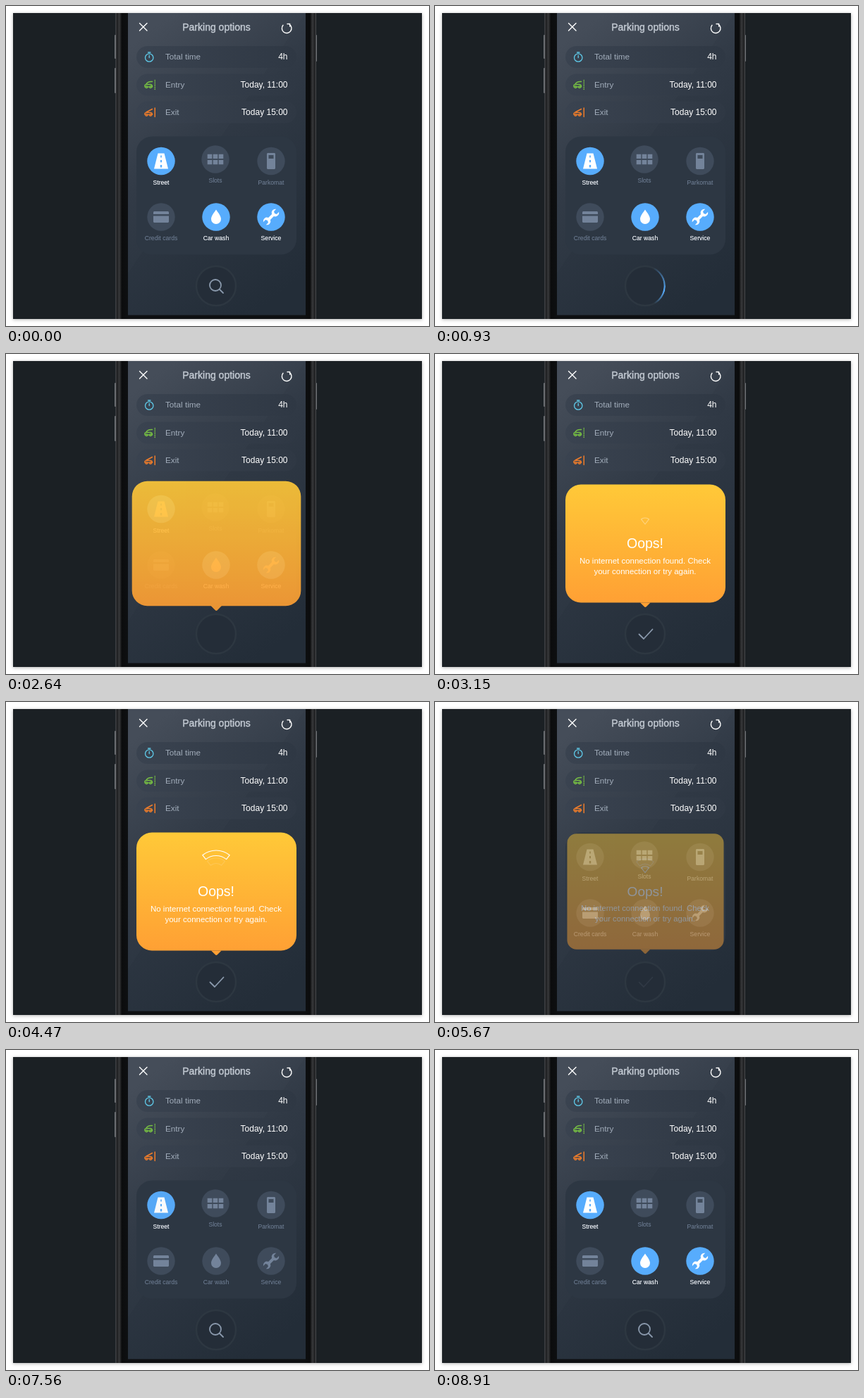
An HTML page for the animation above (8.94 s loop, 600 by 455 pixels).

```html
<!DOCTYPE html>
<html lang="en">
<head>
<meta charset="utf-8">
<title>Parking options</title>
<style>
  html, body { margin: 0; width: 100%; height: 100%; overflow: hidden; background: #fff; }
  svg { position: absolute; left: 0; top: 0; }
  text { font-family: "Liberation Sans", Arial, sans-serif; }
  .line { fill: none; stroke-linecap: round; stroke-linejoin: round; }
  .row { font-size: 11.7px; }
  .label { font-size: 8.65px; text-anchor: middle; }
  #spinner {
    position: absolute; left: 269px; top: 369px; width: 58px; height: 58px; border-radius: 50%;
    background: conic-gradient(#57acfd00, #57acfd 80deg, #57acfd00 128deg);
    -webkit-mask: radial-gradient(circle, #0000 26.2px, #000 27px);
    mask: radial-gradient(circle, #0000 26.2px, #000 27px);
  }
</style>
</head>
<body>
<svg width="600" height="455" viewBox="0 0 600 455">
  <defs>
    <filter id="shadow" x="-5%" y="-5%" width="110%" height="110%" color-interpolation-filters="sRGB">
      <feDropShadow dx="0" dy="1" stdDeviation="2.5" flood-opacity=".3"/>
    </filter>
    <linearGradient id="screen" x1=".25" y1="0" x2=".7" y2="1">
      <stop stop-color="#434b57"/><stop offset=".4" stop-color="#303945"/><stop offset="1" stop-color="#232d38"/>
    </linearGradient>
    <linearGradient id="pill">
      <stop stop-color="#3a4350"/><stop offset="1" stop-color="#2f3844"/>
    </linearGradient>
    <linearGradient id="edge">
      <stop stop-color="#56585b"/><stop offset=".1" stop-color="#1c1d1f"/><stop offset=".3" stop-color="#38393b"/>
      <stop offset=".5" stop-color="#0b0c0d"/><stop offset="1" stop-color="#0e1012"/>
    </linearGradient>
    <linearGradient id="warm" x2="0" y2="1">
      <stop stop-color="#ffc938"/><stop offset="1" stop-color="#ffa034"/>
    </linearGradient>
  </defs>

  <rect x="10" y="10" width="580" height="435" fill="#1b2024" filter="url(#shadow)"/>
  <g fill="#707377">
    <rect x="154" y="41" width="2.5" height="34" rx="1"/>
    <rect x="154" y="88" width="2.5" height="36" rx="1"/>
    <rect x="438.5" y="41" width="2.5" height="38" rx="1"/>
  </g>
  <rect x="170" y="10" width="258" height="435" fill="#0e1012"/>
  <rect x="155.5" y="10" width="17.5" height="435" fill="url(#edge)"/>
  <rect x="155.5" y="10" width="17.5" height="435" fill="url(#edge)" transform="translate(595.500) scale(-1 1)"/>
  <rect x="173" y="10" width="252" height="429.5" fill="url(#screen)"/>
  <path d="M173 10H425L173 380z" fill="#fff" opacity=".012"/>

  <g class="line" stroke="#fff" stroke-width="1.4">
    <path d="M189.5 24.5l10.5 10.5m0-10.500l-10.500 10.500"/>
    <path d="M402.300 26.300A6.800 6.800 0 1 1 393 27.300M399 25.500h3.700v3.500"/>
  </g>
  <text x="298.5" y="34.5" font-size="14" text-anchor="middle" fill="#c3cad3" stroke="#c3cad3" stroke-width=".4">Parking options</text>

  <g fill="url(#pill)">
    <rect x="185" y="57" width="227" height="31" rx="15.5"/>
    <rect x="185" y="96.5" width="227" height="31" rx="15.5"/>
    <rect x="185" y="135.5" width="227" height="31" rx="15.5"/>
  </g>
  <g class="row" fill="#a2adbb">
    <text x="226" y="76">Total time</text>
    <text x="226" y="115.5">Entry</text>
    <text x="226" y="155">Exit</text>
  </g>
  <g class="row" fill="#fff" text-anchor="end" style="font-size: 12px">
    <text x="399.5" y="76">4h</text>
    <text x="399.5" y="115.5">Today, 11:00</text>
    <text x="399.5" y="155">Today 15:00</text>
  </g>
  <g class="line" stroke="#5fcbea" stroke-width="1.3">
    <circle cx="203.2" cy="73.5" r="5.7"/>
    <path d="M201.500 66h3.400M203.200 70.500v3"/>
  </g>
  <g class="line" stroke="#77c043" stroke-width="1.5">
    <path d="M197 115v-2.500l2-1.500q2-4 8.500-3.500M199 111.500h6q2.500.5 2.500 3.500h-1m-3.500 0h-2"/>
    <circle cx="199.300" cy="115.300" r="1.300"/><circle cx="205" cy="115.300" r="1.300"/>
    <path d="M211.200 105.500v13" stroke-dasharray=".6 1.900"/>
  </g>
  <g class="line" stroke="#f07d2a" stroke-width="1.5">
    <path d="M197 154.500v-2l2-1.500 8.500-4.500M199 151.500h6q2.500.5 2.500 3h-1m-3.500 0h-2"/>
    <circle cx="199.300" cy="155" r="1.300"/><circle cx="205" cy="155" r="1.300"/>
    <path d="M211.200 145v12.500"/>
  </g>

  <rect x="185" y="185.5" width="227" height="168" rx="22" fill="#2d3743"/>
  <g id="tiles"></g>

  <g id="popup">
    <rect id="bubble" x="185" y="185.5" width="227" height="168" fill="url(#warm)"/>
    <path d="M291 353.400H305.500L300 359Q298.300 361 296.600 359z" fill="#ffa034"/>
    <g id="message" fill="#fff" text-anchor="middle">
      <text x="298" y="276" font-size="19.5">Oops!</text>
      <text x="298" y="298" font-size="11.5">No internet connection found. Check</text>
      <text x="298" y="313" font-size="11.5">your connection or try again.</text>
    </g>
    <g id="wifi" class="line" stroke="#fff" stroke-width="1.1"></g>
  </g>

  <circle cx="298" cy="398" r="28" fill="#242d38" stroke="#2d3741" stroke-width="2.5"/>
  <g class="line" stroke="#8a99ac" stroke-width="1.8">
    <path id="search" d="M303 403l5 5M305 397a8 8 0 1 1-16 0a8 8 0 1 1 16 0"/>
    <path id="check" d="M289.500 398.500l6.500 6.500 12.500-13.500"/>
  </g>
</svg>
<div id="spinner"></div>

<script>
const LOOP = 8940;
const $ = id => document.getElementById(id);
const ramp = (t, from, to) => Math.min(1, Math.max(0, (t - from) / (to - from)));
const mix = (a, b, k) => a + (b - a) * k;
const smooth = k => k * k * (3 - 2 * k);
const fade = (id, k) => { $(id).style.opacity = k; };

const square = (x, y) => `M${x} ${y}h6.600v6.300h-6.600z`;
const slots = [-11.3, -3.3, 4.7].map(x => square(x, -7.2) + square(x, .9)).join('');
// name, x, y, label baseline, time it is switched on, glyph
const tiles = [
  ['Street', 220, 220.5, 254, 7200, 'M-4.500-11H4.500L10 11H-10zM-.8-8V-5H.8V-8zM-1-1.500V1.800H1V-1.500zM-1.200 5.500V9H1.200V5.500z'],
  ['Slots', 297, 218, 251, 0, slots],
  ['Parkomat', 376, 220.5, 254, 0, 'M-5-11.500H5L6-10.500V10.500L5 11.500H-5L-6 10.500V-10.500zM-3.500-8.500V-3.500H3.500V-8.500z'],
  ['Credit cards', 220, 300, 333, 0, 'M-10-8H10L11-7V7L10 8H-10L-11 7V-7zM-11-4V-1.500H11V-4z'],
  ['Car wash', 298, 300, 333, 8520, 'M0-10.500C3-6 7-1.500 7 3A7 7 0 0 1-7 3C-7-1.500-3-6 0-10.500z'],
  ['Service', 376, 300, 333, 7920, 'M-2-3.500A5.400 5.400 0 0 1-2.800-13V-8.500L0-7L2.800-8.500V-13A5.400 5.400 0 0 1 2-3.500V3.500A5.400 5.400 0 0 1 2.800 13V8.500L0 7L-2.800 8.500V13A5.400 5.400 0 0 1-2 3.500z'],
];

function face([name, x, y, base, , glyph], kind, disc, ink) {
  const turn = name === 'Service' ? ' rotate(45)' : '';
  return `<g class="${kind}" fill="${ink}"><circle cx="${x}" cy="${y}" r="19.7" fill="${disc}"/>
    <path transform="translate(${x} ${y})${turn}" fill-rule="evenodd" d="${glyph}"/>
    <text class="label" x="${x}" y="${base}">${name}</text></g>`;
}
$('tiles').innerHTML = tiles.map(tile =>
  face(tile, 'off', '#3f4b5b', '#73839a') + (tile[4] ? face(tile, 'on', '#57acfd', '#fff') : '')).join('');
const offFaces = document.querySelectorAll('.off');
const onFaces = document.querySelectorAll('.on');
const starts = tiles.map(tile => tile[4]).filter(Boolean);

// A wifi sector between two radii, opening upwards from (298, 242)
function band(inner, outer) {
  const s = Math.sin(.67), c = Math.cos(.67);
  const at = (r, side) => `${298 + side * r * s} ${242 - r * c}`;
  return `<path d="M${at(inner, -1)}L${at(outer, -1)}A${outer} ${outer} 0 0 1 ${at(outer, 1)}
    L${at(inner, 1)}A${inner} ${inner} 0 0 0 ${at(inner, -1)}z"/>`;
}
$('wifi').innerHTML = band(.01, 9) + band(12.5, 20) + band(23.5, 31);
const bands = [...$('wifi').children];

function pulse(t, peak) {
  const period = 780;
  if (t < 0) return 0;
  let gap = Math.abs(t % period - peak);
  if (t > period) gap = Math.min(gap, period - gap);
  return Math.max(0, 1 - gap / 260) ** 1.3;
}

function popupScale(t) {
  if (t < 2700) return mix(.75, 1.08, Math.sin(ramp(t, 2460, 2700) * Math.PI / 2));
  if (t < 5430) return mix(1.08, 1, smooth(ramp(t, 2700, 2940)));
  if (t < 5560) return mix(1, 1.08, smooth(ramp(t, 5430, 5560)));
  return mix(1.08, .75, ramp(t, 5560, 5760) ** 2);
}

function draw(t) {
  const reset = t > 4000;
  offFaces.forEach(el => el.setAttribute('fill', reset && t < 6780 ? '#7d90ab' : '#73839a'));
  onFaces.forEach((el, i) => {
    el.style.opacity = reset ? ramp(t, starts[i], starts[i] + 375) : 1;
  });

  fade('search', t < 3000 ? 1 - ramp(t, 0, 300) : ramp(t, 5700, 5970));
  fade('check', ramp(t, 2700, 3000) * (1 - ramp(t, 5430, 5700)));
  fade('spinner', ramp(t, 250, 600) * (1 - ramp(t, 2250, 2530)));
  $('spinner').style.transform = `rotate(${24 + (t - 930) * .375}deg)`;

  const scale = popupScale(t);
  const shown = ramp(t, 2460, 2660) * (1 - ramp(t, 5570, 5760));
  fade('popup', shown);
  $('bubble').setAttribute('rx', mix(6, 22, shown));
  $('popup').setAttribute('transform', `translate(298.300 270.200) scale(${scale}) translate(-298.300 -270.200)`);
  fade('message', ramp(t, 2670, 2970));
  bands.forEach((el, i) => { el.style.opacity = pulse(t - 3120, 170 + 200 * i); });
}

function tick() {
  draw(performance.now() % LOOP);
  requestAnimationFrame(tick);
}
tick();
</script>
</body>
</html>
```
